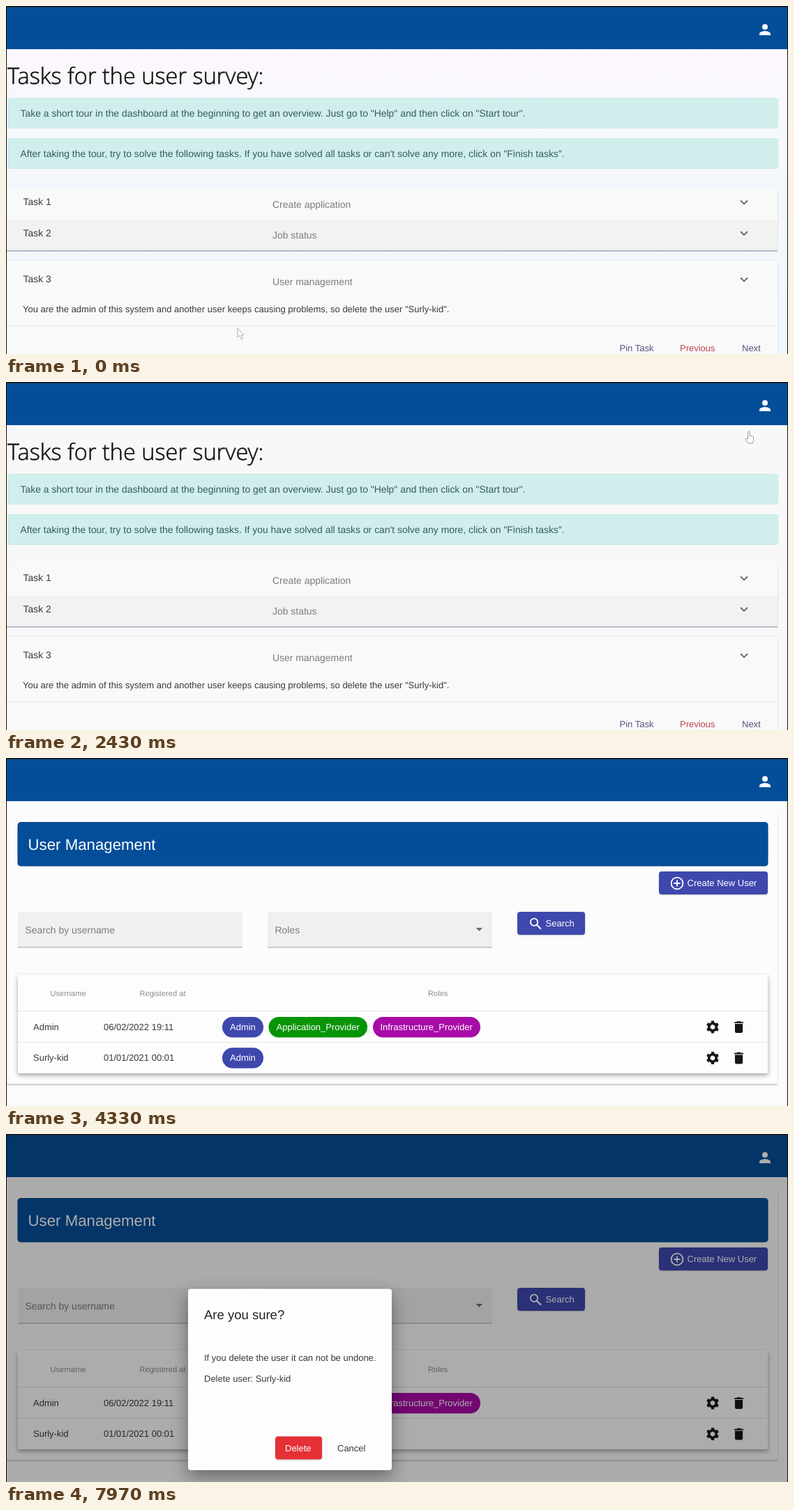
These frames come from a looping animation (1121 by 500 pixels, 8 s). An HTML page:

```html
<!DOCTYPE html>
<html lang="en">
<head>
<meta charset="utf-8">
<title>User management</title>
<style>
  html, body { margin: 0; width: 100%; height: 100%; overflow: hidden; background: #f8f8f8; }
  svg { display: block; width: 1121px; height: 500px; }
  text { font: 13px "Liberation Sans", Arial, sans-serif; fill: #3a3a3c; white-space: pre; text-rendering: geometricPrecision; }
  .h1 { font: 300 32.5px "Open Sans", sans-serif; fill: #111; stroke: #111; stroke-width: .5; }
  .bar { font-size: 22.25px; }
  .title { font-size: 18.5px; fill: #222; }
  .mid { font-size: 13.93px; }
  .small { font-size: 11.1px; fill: #8c8c8c; }
  .muted { fill: #7c7c7c; }
  .note { fill: #38595f; }
  .link { fill: #55527f; }
  .warn { fill: #bf4350; }
  .light { fill: #fff; }
  .alert { fill: #d0efec; stroke: #c6ebe7; }
  .brand { fill: #044e99; }
  .indigo { fill: #3e48ad; }
  .field { fill: #f0f0ee; }
  .line { fill: none; stroke-width: 1.8; }
  .raised { filter: drop-shadow(0 3px 3px #0005); }
  .flat { filter: drop-shadow(0 1px 1px #0003); }
</style>
</head>
<body>
<svg viewBox="0 0 1121 500">
  <defs>
    <linearGradient id="wash" x2="0" y2="1">
      <stop stop-color="#fff7fc"/><stop offset=".45" stop-color="#f5f8fc"/><stop offset="1" stop-color="#eff7fc"/>
    </linearGradient>
    <path id="chevron" class="line" stroke="#666" d="M-5-2.5 0 2.5 5-2.5"/>
    <g id="actions">
      <g class="line" stroke="#161616" transform="translate(1013 0) rotate(30)">
        <circle r="5.2" stroke-width="3.8"/>
        <circle r="7.6" stroke-width="3" pathLength="12" stroke-dasharray="1" stroke-dashoffset=".5"/>
      </g>
      <path fill="#161616" transform="translate(1039.4 -11) scale(.927)"
        d="M6 19c0 1.1.9 2 2 2h8c1.1 0 2-.9 2-2V7H6zM19 4h-3.5l-1-1h-5l-1 1H5v2h14z"/>
    </g>
  </defs>

  <g id="tasks">
    <rect width="1121" height="500" fill="#f8f8f8"/>
    <rect id="tint" width="1121" height="500" fill="url(#wash)"/>
    <text class="h1" x="2" y="112">Tasks for the user survey:</text>
    <rect class="alert" x="2.5" y="132.5" width="1104" height="43" rx="3"/>
    <rect class="alert" x="2.5" y="190.5" width="1104" height="43" rx="3"/>
    <text class="mid note" x="20.5" y="159">Take a short tour in the dashboard at the beginning to get an overview. Just go to "Help" and then click on "Start tour".</text>
    <text class="mid note" x="20.5" y="216.5">After taking the tour, try to solve the following tasks. If you have solved all tasks or can't solve any more, click on "Finish tasks".</text>
    <g class="flat" fill="#fdfdfd" fill-opacity=".9">
      <rect x="1" y="263" width="1105" height="88"/>
      <rect x="1" y="366" width="1105" height="140"/>
    </g>
    <rect x="1" y="307" width="1105" height="44" fill="#f2f2f0"/>
    <path stroke="#a9a9c2" stroke-width="1.6" d="M1 351.7H1106"/>
    <path stroke="#ececf0" d="M1 459.5H1106M1 365.5H1106"/>
    <text class="mid" x="24.5" y="286">Task 1</text>
    <text class="mid" x="24.5" y="330.5">Task 2</text>
    <text class="mid" x="24.5" y="397">Task 3</text>
    <text class="mid muted" x="382" y="289.5">Create application</text>
    <text class="mid muted" x="382" y="333.5">Job status</text>
    <text class="mid muted" x="382" y="400.5">User management</text>
    <use href="#chevron" x="1058" y="282"/>
    <use href="#chevron" x="1058" y="326.5"/>
    <use href="#chevron" x="1058" y="393"/>
    <text x="24" y="439.5">You are the admin of this system and another user keeps causing problems, so delete the user "Surly-kid".</text>
    <text class="link" x="879.5" y="496">Pin Task</text>
    <text class="warn" x="966" y="496">Previous</text>
    <text class="link" x="1055" y="496">Next</text>
  </g>

  <g id="users">
    <rect width="1121" height="500" fill="#fbfbfb"/>
    <rect class="flat" x="1" y="78" width="1105" height="390.5" fill="#fcfcfc"/>
    <path stroke="#c4c4c6" d="M1 469H1106"/>
    <rect class="brand" x="17" y="92.5" width="1075" height="62.5" rx="4" stroke="#033f80"/>
    <text class="bar light" x="31.5" y="131.5">User Management</text>

    <g class="flat indigo">
      <rect x="936" y="163" width="156" height="33" rx="4"/>
      <rect x="733" y="221" width="97" height="33" rx="4"/>
    </g>
    <g class="line" stroke="#fff">
      <circle cx="962" cy="180" r="8.4"/>
      <path d="M962 175.4v9.2M957.4 180h9.2"/>
      <circle cx="757" cy="235.8" r="5.2"/>
      <path stroke-width="2.2" d="M760.8 239.6l6 6"/>
    </g>
    <text class="light" x="976.5" y="184.3">Create New User</text>
    <text class="light" x="773.5" y="242">Search</text>

    <path class="field" d="M17 272V225q0-4 4-4H335q4 0 4 4V272zM375 272V225q0-4 4-4H693q4 0 4 4V272z"/>
    <path stroke="#a3a398" d="M17 272H339M375 272H697"/>
    <path fill="#6b6b6b" d="M673.6 244h9.6l-4.8 4.8z"/>
    <text class="mid muted" x="27.5" y="252">Search by username</text>
    <text class="mid muted" x="385.5" y="252">Roles</text>

    <rect class="raised" x="17" y="311" width="1075" height="142" rx="2" fill="#fdfdfd"/>
    <g id="rules">
      <path stroke="#e2e2f0" d="M17 363.5H1092"/>
      <path stroke="#e9e2da" d="M17 408.5H1092"/>
    </g>
    <text class="small" x="63.5" y="341.7">Username</text>
    <text class="small" x="191.5" y="341.7">Registered at</text>
    <text class="small" x="605" y="341.7">Roles</text>
    <text x="39" y="391">Admin</text>
    <text x="140" y="391">06/02/2022 19:11</text>
    <text x="39" y="435.3">Surly-kid</text>
    <text x="140" y="435.3">01/01/2021 00:01</text>
    <rect class="indigo" x="310" y="372" width="59" height="29.5" rx="14.7"/>
    <rect class="indigo" x="310" y="416.3" width="59" height="29.5" rx="14.7"/>
    <rect fill="#079407" x="376.5" y="372" width="141.5" height="29.5" rx="14.7"/>
    <rect fill="#a80ba8" x="526" y="372" width="154" height="29.5" rx="14.7"/>
    <text class="light" x="321" y="391">Admin</text>
    <text class="light" x="321" y="435.3">Admin</text>
    <text class="light" x="387.5" y="391">Application_Provider</text>
    <text class="light" x="536.5" y="391">Infrastructure_Provider</text>
    <use href="#actions" y="386.5"/>
    <use href="#actions" y="431"/>
  </g>

  <rect class="brand" width="1121" height="62"/>
  <path fill="#fff" transform="translate(1076 22)"
    d="M12 12a4 4 0 1 0 0-8 4 4 0 0 0 0 8zm0 2c-2.67 0-8 1.34-8 4v2h16v-2c0-2.66-5.33-4-8-4z"/>

  <g id="shade"><rect width="1121" height="500"/></g>
  <rect y="1" width="1121" height="1" fill="#1c2f45"/>
  <path fill="none" stroke="#0b0b0d" d="M.5 500V.5H1120.5V500"/>

  <g id="dialog">
    <rect x="261" y="222.5" width="292" height="260.5" rx="4" fill="#fdfdfd" style="filter:drop-shadow(0 9px 12px #0006)"/>
    <text class="title" x="284" y="266">Are you sure?</text>
    <text x="284" y="325.8">If you delete the user it can not be undone.</text>
    <text x="284" y="355.5">Delete user: Surly-kid</text>
    <rect class="flat" x="386" y="434.5" width="67" height="33" rx="4" fill="#e43036"/>
    <text class="light" x="400" y="455.7">Delete</text>
    <text x="475" y="455.7">Cancel</text>
  </g>

  <path id="arrow" fill="#fff" stroke="#a9a9ae" stroke-width=".9" d="M0 0V13L3 10.3 5.4 16 7.6 15 5.2 9.6H9z"/>
  <path id="hand" fill="#fff" stroke="#8a8a90" stroke-width=".9"
    d="M4 11V2q0-1.5 1.3-1.5T6.6 2V7q4.6 0 5.4 1.8V13q0 2-1.6 4.5H4.6L.8 12.4q-.6-1.6.8-2z"/>
</svg>
<script>
  const DURATION = 8000;
  const el = id => document.getElementById(id);
  const [tasks, tint, users, rules, shade, dialog, arrow, hand] =
    ["tasks", "tint", "users", "rules", "shade", "dialog", "arrow", "hand"].map(el);

  const progress = (t, from, to) => Math.min(1, Math.max(0, (t - from) / (to - from)));
  const easeOut = p => 1 - (1 - p) ** 3;
  const easeInOut = p => p * p * (3 - 2 * p);
  const mix = (a, b, p) => a + (b - a) * p;
  const show = (node, visible) => node.style.display = visible ? "" : "none";
  const place = (node, x, y) => node.setAttribute("transform", `translate(${x} ${y})`);

  function drawPointer(t) {
    const toIcon = easeInOut(progress(t, 1530, 1770));
    show(arrow, t < 1770);
    place(arrow, mix(332, 1086, toIcon), mix(463, 34, toIcon));

    const onTrash = t >= 6230 && t < 7720;
    const toItem = easeInOut(progress(t, 2400, 2500));
    show(hand, onTrash || t >= 1770 && t < 3200);
    hand.style.opacity = onTrash ? 1 : 1 - progress(t, 3040, 3200);
    if (onTrash) place(hand, 1035.5, 431);
    else place(hand, mix(1082, 984, toItem), mix(33, 197, toItem));
  }

  function draw(t) {
    show(tasks, t < 3070);
    show(users, t >= 3070);
    tint.style.opacity = 1 - progress(t, 70, 700);
    rules.style.opacity = progress(t, 3100, 3500);

    shade.style.opacity = .32 * easeOut(progress(t, 7690, 7970));
    const open = easeOut(progress(t, 7690, 7850));
    const scale = mix(.7, 1, open);
    show(dialog, open > 0);
    dialog.style.opacity = open;
    dialog.setAttribute("transform", `translate(407 353) scale(${scale}) translate(-407 -353)`);

    drawPointer(t);
  }

  function tick() {
    draw(performance.now() % DURATION);
    requestAnimationFrame(tick);
  }
  tick();
</script>
</body>
</html>
```
